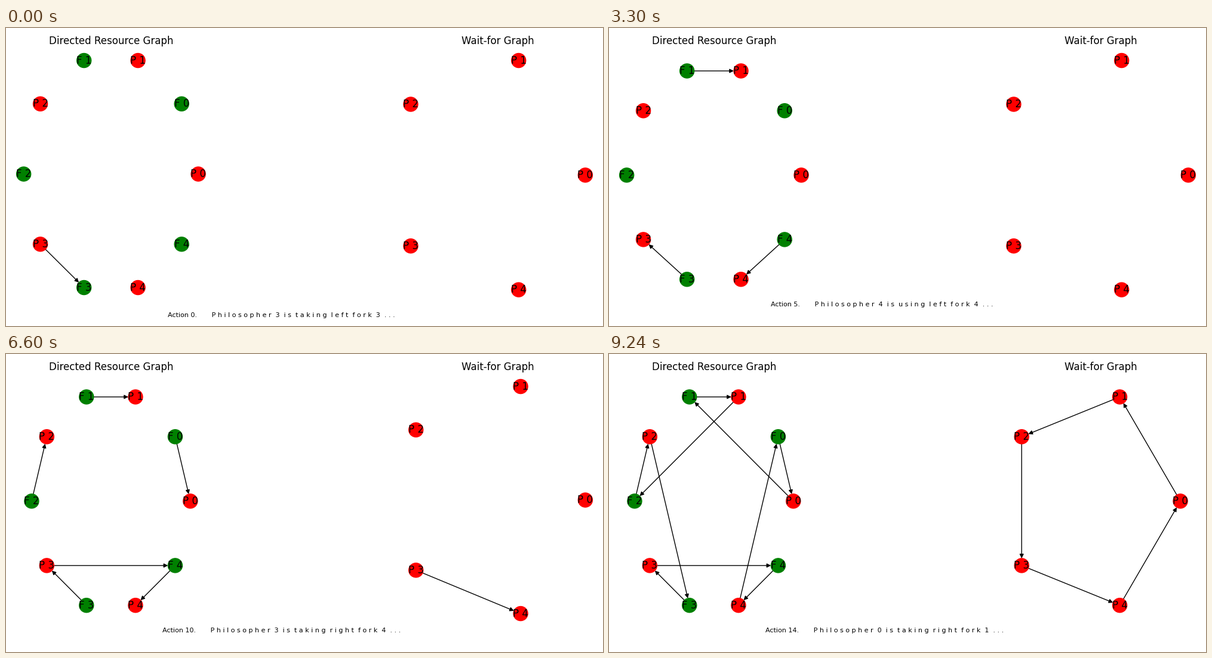
A matplotlib script that plays this animation: 1000x500 px, repeating every 9900 ms.

```python
import matplotlib.pyplot as plt
import numpy as np
from matplotlib.animation import FuncAnimation
from matplotlib.patches import FancyArrowPatch

W, H, DPI = 1000, 500, 100
SEATS = 5
NODE_SIZE = 300

# (philosopher, verb, side), one entry per action
ACTIONS = [(p, verb, "left") for p in (3, 1, 4, 2, 0) for verb in ("taking", "using")]
ACTIONS += [(p, "taking", "right") for p in (3, 1, 4, 2, 0)]


def circle(names):
    angles = 2 * np.pi * np.arange(len(names)) / len(names)
    return {n: (np.cos(a), np.sin(a)) for n, a in zip(names, angles)}


RESOURCE = circle([f"{kind} {i}" for i in range(SEATS) for kind in "PF"])
WAIT = circle([f"P {i}" for i in range(SEATS)])

plt.rcParams["font.family"] = "DejaVu Sans"
fig = plt.figure(figsize=(W / DPI, H / DPI), dpi=DPI, facecolor="white")


def add_axes(x, y, w, h):
    return fig.add_axes([x / W, y / H, w / W, h / H])


left_ax = add_axes(15, 41.6, 321.7, 423.1)
right_ax = add_axes(663.3, 41.6, 321.7, 423.1)


def edges_at(step):
    """Edges of both graphs once the given action has started."""
    held, wanted, waits = {}, [], []
    for p, verb, side in ACTIONS[:step + 1]:
        if side == "right":
            q = (p + 1) % SEATS
            wanted.append((f"P {p}", f"F {q}"))
            waits.append((f"P {p}", f"P {q}"))
        elif verb == "taking":
            held[p] = (f"P {p}", f"F {p}")
        else:
            held[p] = (f"F {p}", f"P {p}")
    return list(held.values()) + wanted, waits


def limits(pos, edges):
    """View limits: nodes plus the padded box of the edges, with a 5% margin."""
    pts = np.array(list(pos.values()))
    lo, hi = pts.min(axis=0), pts.max(axis=0)
    if edges:
        ends = np.array([pos[n] for edge in edges for n in edge])
        e_lo, e_hi = ends.min(axis=0), ends.max(axis=0)
        pad = 0.05 * (e_hi - e_lo)
        lo, hi = np.minimum(lo, e_lo - pad), np.maximum(hi, e_hi + pad)
    margin = 0.05 * (hi - lo)
    return lo - margin, hi + margin


def draw_graph(ax, title, pos, edges):
    ax.clear()
    ax.set_axis_off()
    ax.set_title(title, fontsize=12)
    lo, hi = limits(pos, edges)
    ax.set_xlim(lo[0], hi[0])
    ax.set_ylim(lo[1], hi[1])

    shrink = np.sqrt(NODE_SIZE) / 2
    for a, b in edges:
        ax.add_patch(FancyArrowPatch(
            pos[a], pos[b], arrowstyle="-|>", mutation_scale=10, color="black",
            linewidth=1, shrinkA=shrink, shrinkB=shrink, zorder=1))

    x, y = zip(*pos.values())
    colors = ["red" if n[0] == "P" else "green" for n in pos]
    ax.scatter(x, y, s=NODE_SIZE, c=colors, zorder=2)
    for name, (px, py) in pos.items():
        ax.text(px, py, name, fontsize=12, ha="center", va="center", zorder=3)


def caption(step):
    p, verb, side = ACTIONS[step]
    fork = p if side == "left" else (p + 1) % SEATS
    words = f"Philosopher {p} is {verb} {side} fork {fork} ...".split()
    spaced = "  ".join(" ".join(word) for word in words)
    return f"Action {step}." + " " * 7 + spaced


def update(step):
    resource_edges, wait_edges = edges_at(step)
    draw_graph(left_ax, "Directed Resource Graph", RESOURCE, resource_edges)
    draw_graph(right_ax, "Wait-for Graph", WAIT, wait_edges)
    left_ax.text(0.65, -1.2, caption(step), fontsize=8)
    return []


anim = FuncAnimation(fig, update, frames=len(ACTIONS), interval=660,
                     init_func=lambda: update(0), repeat=True, repeat_delay=0)
plt.show()
```
